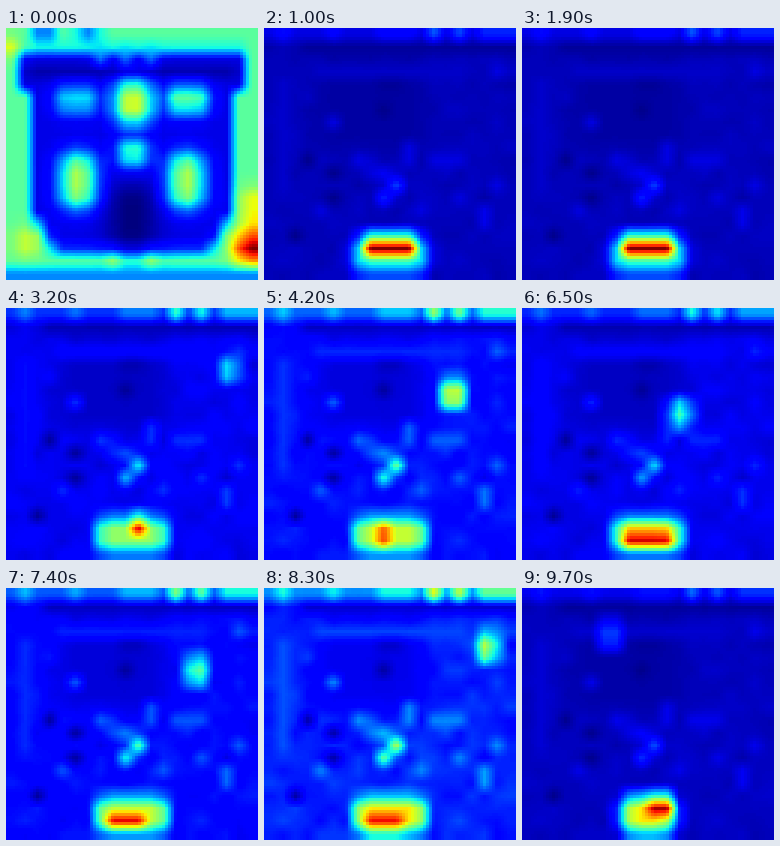
These frames come from a looping animation (252 px wide and 252 px high, 9800 ms). A matplotlib script:

```python
import numpy as np
import matplotlib.pyplot as plt
from matplotlib.animation import FuncAnimation

SIZE, CELLS, RES = 252, 20, 84
FRAMES, STEP = 98, 100
MID = (CELLS - 1) / 2
rows, cols = np.mgrid[0:CELLS, 0:CELLS].astype(float)


def upscale_matrix():
    """Weights for linear interpolation from CELLS samples to RES samples."""
    pos = (np.arange(RES) + 0.5) * CELLS / RES - 0.5
    pos = np.clip(pos, 0, CELLS - 1)
    return np.clip(1 - np.abs(pos[:, None] - np.arange(CELLS)), 0, 1)


WEIGHTS = upscale_matrix()


def bump(cx, cy, half_w=0.0, half_h=0.0, soft=0.9):
    """Flat-topped blob with soft edges, in cell units."""
    dx = np.maximum(np.abs(cols - cx) - half_w, 0)
    dy = np.maximum(np.abs(rows - cy) - half_h, 0)
    return np.exp(-(dx**2 + dy**2) / soft**2)


def paint(m, level, *shape, **kw):
    """Pull the map towards a level inside a blob."""
    m += (level - m) * bump(*shape, **kw)


def opening_map():
    # dark vessel: wide rim, straight sides, tapering base
    half = np.where(rows < 4.5, 8.5, 7.5 - 0.55 * np.maximum(rows - 14, 0))
    outside = np.maximum.reduce(
        [np.abs(cols - MID) - half, 1.8 - rows, rows - 16.8])
    m = 0.09 + 0.37 * np.clip(outside, 0, 1)
    paint(m, 0.04, MID, 3, 8, soft=0.6)
    paint(m, 0.00, MID, 14.5, 0.3, 1, soft=1.8)

    # bright spots inside
    for side in (-1, 1):
        paint(m, 0.57, MID + 4.3 * side, 11.6, 0.1, 0.9, soft=1.35)
        paint(m, 0.41 + 0.06 * side, MID + 4.4 * side, 5.2, 0.8, 0.2, soft=0.95)
    paint(m, 0.60, MID + 0.1, 5.4, 0.4, 0.6, soft=1.15)
    paint(m, 0.42, MID + 0.1, 9.4, 0.4, 0.2, soft=0.9)

    # surroundings: sky gaps, floor and the hot corner
    for x in (2.5, 6):
        paint(m, 0.25, x, 0, 0.4, soft=0.6)
    for x in (7, 9, 11):
        paint(m, 0.30, x, 1.6, soft=0.6)
    paint(m, 0.62, 0, 1, soft=0.8)
    paint(m, 0.62, 1.2, 16.5, soft=1.1)
    for x in (8, 11):
        paint(m, 0.54, x, 18, soft=0.6)
    paint(m, 0.64, 19, 14.7, 0, 1.5, soft=1.0)
    paint(m, 1.00, 19, 17, 0.2, soft=1.25)
    m[19] = 0.26
    return m


def resting_map():
    rng = np.random.default_rng(7)
    m = 0.16 + 0.02 * rng.standard_normal((CELLS, CELLS))
    paint(m, 0.10, 8, 5.5, 3, 2.5, soft=1.5)
    paint(m, 0.21, 1, 8, 0, 4, soft=0.6)
    paint(m, 0.07, 11, 1, 8, soft=0.5)
    paint(m, 0.20, MID, 3, 6, soft=0.5)

    # bright strip along the top
    m[0] = 0.27 + 0.21 * (cols[0] > 16)
    for x, level in ((1, 0.4), (5, 0.38), (10, 0.39), (13, 0.65), (15, 0.6)):
        paint(m, level, x, 0, float(x == 10), soft=0.5)

    # diagonal trail leading to a brighter knot
    for k in range(4):
        paint(m, 0.28 + 0.03 * k, 7 + k, 10 + 0.6 * k, soft=0.6)
    paint(m, 0.58, 10, 12, soft=0.6)
    paint(m, 0.49, 9, 13, soft=0.6)

    # faint marks and dark holes
    paint(m, 0.27, 11, 9.5, 0, 0.5, soft=0.5)
    paint(m, 0.27, 14, 10, 1, soft=0.5)
    paint(m, 0.29, 17, 14.5, 0, 0.5, soft=0.5)
    for x, y in ((18, 3), (5, 7), (18, 12), (15, 13), (12, 14), (4, 14)):
        paint(m, 0.27, x, y, soft=0.5)
    for x, y in ((9.5, 4), (3, 10), (5, 11), (5, 13), (2, 16), (9, 6)):
        paint(m, 0.03, x, y, soft=0.6)
    return m


OPENING, RESTING = opening_map(), resting_map()


def track(t, *points):
    """Value at time t on straight lines through (ms, value) points."""
    return np.interp(t, *zip(*points))


def ball_layer(t):
    """The spot swings between the right edge and the middle, then goes left."""
    x = track(t, (3200, 17.2), (5100, 12.1), (6500, 12.1), (8300, 17.2), (9700, 6.5))
    y = track(t, (3200, 4.4), (5100, 8.1), (6500, 7.9), (8300, 4.2), (9700, 3.2))
    heat = track(t, (1900, 0), (3200, 0.36), (5100, 1), (6500, 0.44),
                 (8300, 0.6), (9700, 0.22))
    return heat, heat * bump(x, y, 0, 0.3, soft=1.15)


def base_layer(t, ball_heat):
    """Warm patch at the bottom with a hot bar wandering inside it."""
    heat = track(t, (1900, 0.43), (3200, 0.53), (5100, 0.65), (6500, 0.52), (8300, 0.67))
    width = track(t, (8300, 1.9), (9700, 1.0))
    patch = heat * bump(MID, 17.5, width, 0.4, soft=1.25)

    x = track(t, (1900, 9.5), (3200, 10), (5100, 8), (6500, 9.4), (8300, 9), (9700, 10.5))
    y = track(t, (1900, 17), (3200, 17), (5100, 18), (6500, 17.7), (8300, 18), (9700, 17))
    half = track(t, (1900, 1.5), (3200, 0.1), (5100, 0.1), (6500, 1.5),
                 (8300, 1), (9700, 0.5))
    bar = (1 - 0.15 * ball_heat) * bump(x, y, half, 0.3, soft=0.75)
    return np.maximum(patch, bar)


def heat_at(frame):
    if frame == 0:
        return OPENING
    t = frame * STEP
    gain = track(t, (1900, 0.33), (3200, 0.64), (5100, 1), (6500, 0.6),
                 (8300, 0.98), (9700, 0.36))
    ball_heat, ball = ball_layer(t)
    return np.maximum.reduce([gain * RESTING, ball, base_layer(t, ball_heat)])


def picture(frame):
    return WEIGHTS @ heat_at(frame) @ WEIGHTS.T


fig = plt.figure(figsize=(SIZE / 100, SIZE / 100), dpi=100)
ax = fig.add_axes([0, 0, 1, 1])
ax.axis("off")
image = ax.imshow(picture(0), cmap="jet", vmin=0, vmax=1,
                  interpolation="nearest", aspect="auto")


def update(frame):
    image.set_data(picture(frame))
    return (image,)


anim = FuncAnimation(fig, update, frames=FRAMES, interval=STEP,
                     repeat=True, repeat_delay=0, blit=False)
plt.show()
```
